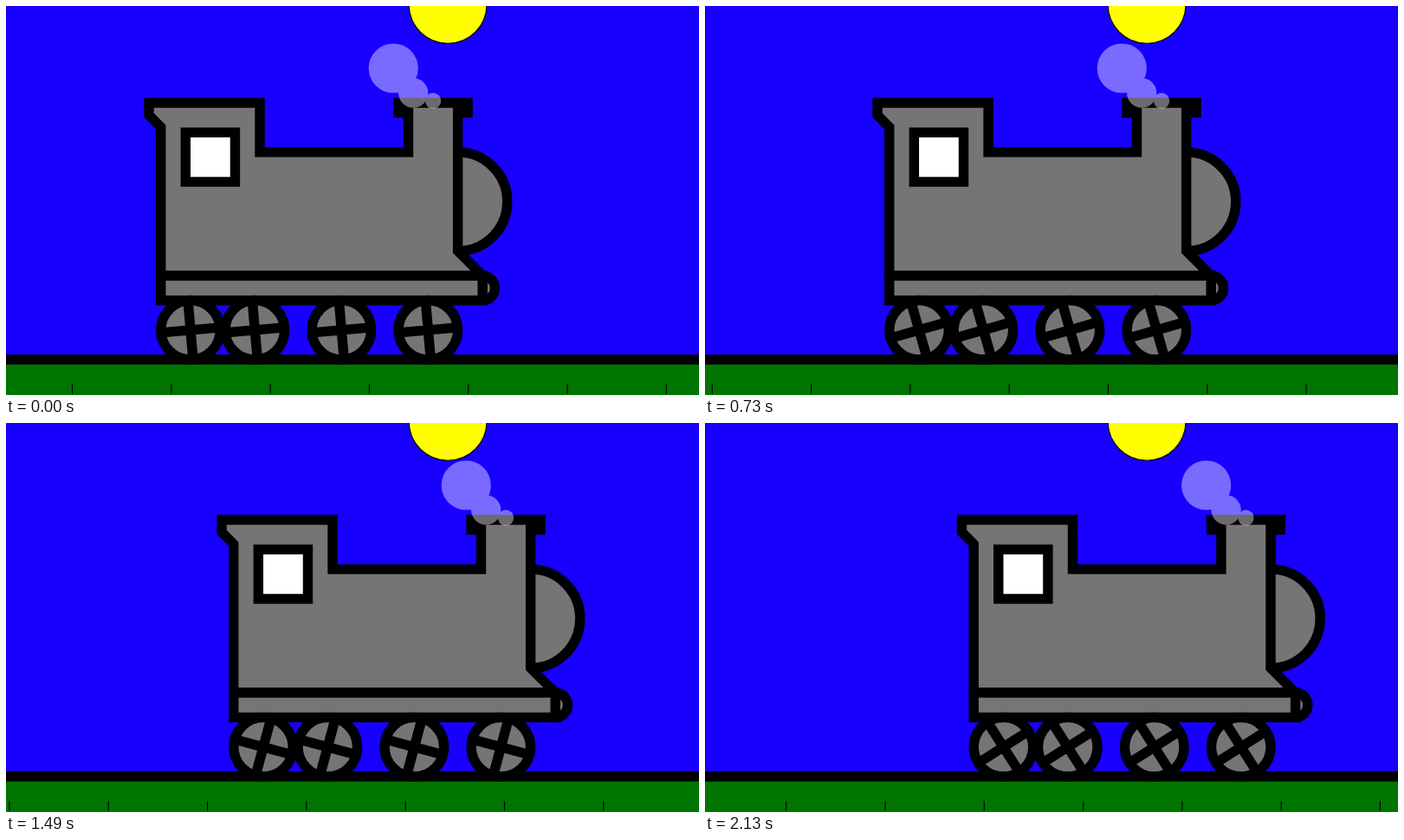
Animation of 800 by 450 pixels, one loop 2.17 s. Source, as an HTML page without scripts:

```html
<!DOCTYPE html>
<html lang="en">
<head>
<meta charset="utf-8">
<title>Steam engine</title>
<style>
  @property --x { syntax: "<number>"; inherits: true; initial-value: 0; }
  @property --road { syntax: "<number>"; inherits: true; initial-value: 0; }

  html, body { margin: 0; width: 100%; height: 100%; overflow: hidden; background: #1800ff; }
  svg { display: block; width: 100vw; height: 100vh; animation: drive 2170ms -8ms infinite; }

  .engine { fill: #757575; stroke: #000; stroke-width: 10; }
  .engine, .smoke { transform: translateX(calc(var(--x) * 1px)); }
  .smoke { fill: #fff; opacity: .42; }
  .ticks { transform: translateX(calc(var(--road) * -1px)); }
  /* the wheels roll as if their radius were 60 */
  .spokes { transform: rotate(calc(var(--road) / 60 * 1rad - 5deg)); }

  /* x: drift across the stage, road: distance travelled; 30 steps a second */
  @keyframes drive {
    0%      { --x: 0;     --road: 0;      animation-timing-function: steps(1); }
    1.382%  { --x: 1;     --road: 11;     animation-timing-function: steps(9); }
    15.207% { --x: 10.1;  --road: 200;    animation-timing-function: steps(12); }
    33.641% { --x: 29.8;  --road: 459.7;  animation-timing-function: steps(12); }
    52.074% { --x: 51.5;  --road: 721.5;  animation-timing-function: steps(11); }
    68.664% { --x: 73.5;  --road: 963.5;  animation-timing-function: steps(12); }
    87.097% { --x: 99.8;  --road: 1229.8; animation-timing-function: steps(7); }
    98.157%, 100% { --x: 115; --road: 1385; }
  }
</style>
</head>
<body>
<svg viewBox="0 0 700 393.75" preserveAspectRatio="none">
  <defs>
    <g id="wheel">
      <circle r="30"/>
      <path class="spokes" d="M-30 0H30M0-30V30"/>
    </g>
  </defs>

  <rect width="700" height="393.75" fill="#1800ff"/>
  <circle cx="446.3" cy="-1.5" r="39.3" fill="#ff0" stroke="#000"/>

  <rect y="357" width="700" height="37" fill="#007500"/>
  <path class="ticks" d="M-33.5 387.5H2200" stroke="#000" stroke-width="10" stroke-dasharray="1 99"/>

  <g class="engine">
    <circle cx="456.4" cy="198" r="50"/>
    <circle cx="481.4" cy="285.5" r="12.5"/>
    <path d="M144.4 98H256.4V148H406.4V108H396.4V98H466.4V108H456.4V248L481.4 273H156.4V122.5L144.4 110.5Z"/>
    <rect x="156.4" y="273" width="325" height="25"/>
    <rect x="181.4" y="128" width="50" height="50" fill="#fff"/>
    <use href="#wheel" x="186.4" y="328"/>
    <use href="#wheel" x="251.4" y="328"/>
    <use href="#wheel" x="338.9" y="328"/>
    <use href="#wheel" x="426.4" y="328"/>
  </g>

  <path d="M0 357.8H700" stroke="#000" stroke-width="10"/>

  <g class="smoke">
    <circle cx="391.3" cy="63" r="25"/>
    <circle cx="411.4" cy="88" r="15"/>
    <circle cx="431.4" cy="96" r="8"/>
  </g>
</svg>
</body>
</html>
```
